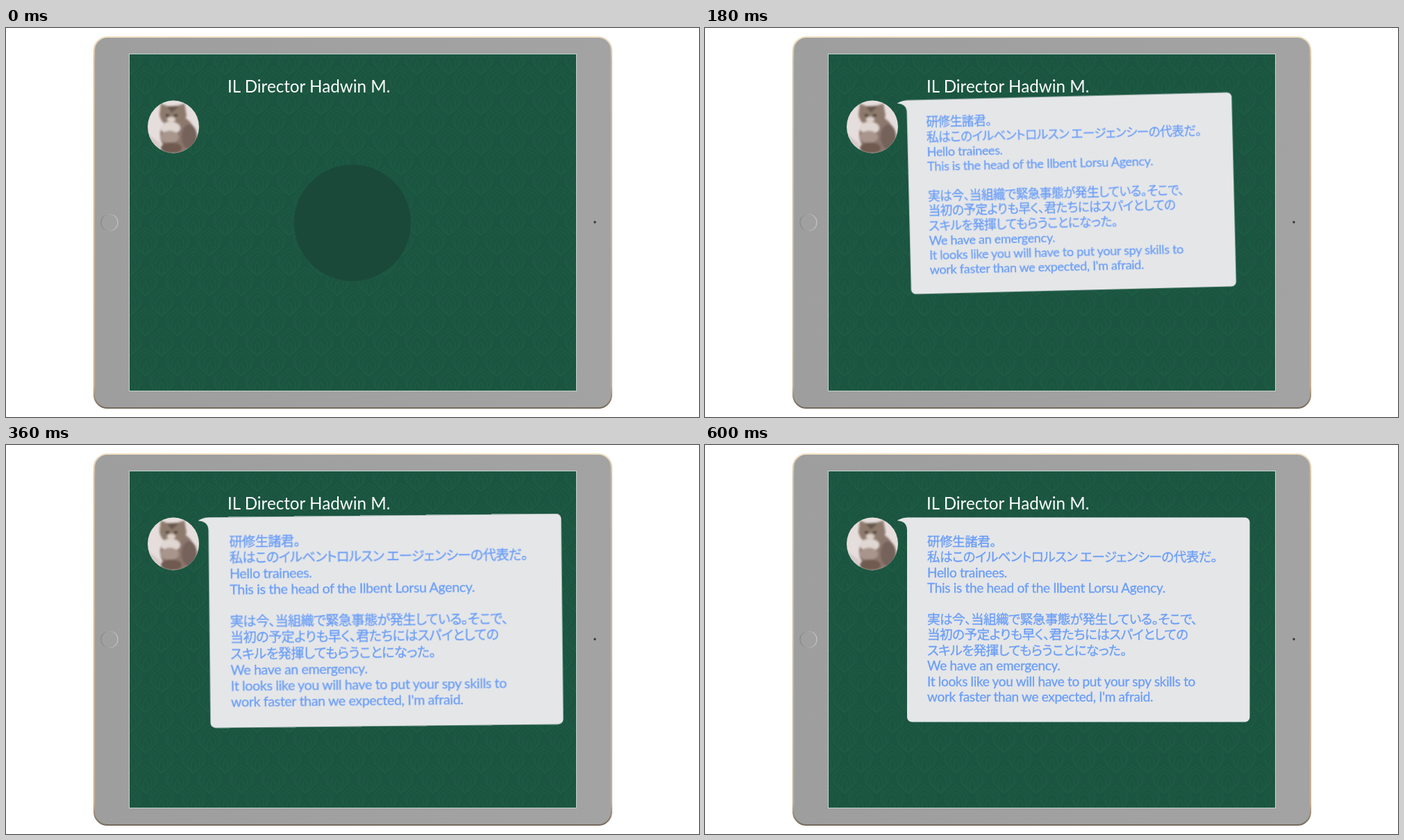
An HTML page that plays this animation: 998x561 px, repeating every 990 ms.

```html
<!DOCTYPE html>
<html lang="ja">
<head>
<meta charset="utf-8">
<title>Tablet message</title>
<style>
  html, body { margin: 0; width: 100%; height: 100%; overflow: hidden; background: #fff; }
  svg { display: block; width: 100%; height: 100%; }
  text { font-family: Lato, "Noto Sans CJK JP", "Noto Sans CJK", sans-serif; }
  .title { font-size: 24.2px; fill: #fff; }
  .line { fill: #6c9ff8; stroke: #6c9ff8; stroke-width: .35px; font-size: 19px; letter-spacing: -.32px; }
  .line.ja { font-family: "Noto Sans CJK JP", "Noto Sans CJK", sans-serif; font-size: 18.6px; letter-spacing: -.55px; font-feature-settings: "palt"; }
  #bubble { transform-origin: 277px 105px; opacity: 0; }
</style>
</head>
<body>
<svg viewBox="0 0 998 561">
  <defs>
    <linearGradient id="body" x2="1">
      <stop offset="0" stop-color="#9e9e9e"/>
      <stop offset="1" stop-color="#a3a3a3"/>
    </linearGradient>
    <linearGradient id="rim" x2="0" y2="1">
      <stop offset="0" stop-color="#f1e0c2"/>
      <stop offset=".06" stop-color="#cfbfa6"/>
      <stop offset=".94" stop-color="#c4b196"/>
      <stop offset="1" stop-color="#756a5c"/>
    </linearGradient>
    <linearGradient id="ring" x2="1">
      <stop offset="0" stop-color="#858585"/>
      <stop offset="1" stop-color="#c6c6c6"/>
    </linearGradient>
    <pattern id="deco" x="178" y="38" width="46" height="58" patternUnits="userSpaceOnUse">
      <g id="fans" fill="none" stroke="#1d5c43"></g>
    </pattern>
    <clipPath id="round"><ellipse cx="241" cy="142.5" rx="37" ry="38"/></clipPath>
    <filter id="soft"><feGaussianBlur stdDeviation="1.6"/></filter>
  </defs>

  <!-- tablet -->
  <rect x="127" y="13" width="745" height="535" rx="19" fill="url(#body)" stroke="url(#rim)" stroke-width="2.2"/>
  <circle cx="149" cy="280.5" r="12" fill="#a0a0a0" stroke="url(#ring)" stroke-width="1.2"/>
  <circle cx="848" cy="280" r="1.7" fill="#333"/>
  <rect x="177.5" y="37.5" width="644" height="486" fill="#1b5541"/>
  <rect x="177.5" y="37.5" width="644" height="486" fill="url(#deco)" stroke="#c3d3cb"/>
  <circle cx="499" cy="281" r="84" fill="#1a493a"/>

  <!-- kitten picture -->
  <g clip-path="url(#round)">
    <rect x="203" y="104" width="76" height="78" fill="#e6dedd"/>
    <g filter="url(#soft)">
      <path d="M203 152 L222 166 L222 182 L203 182Z" fill="#d6cac9"/>
      <ellipse cx="247" cy="154" rx="25" ry="27" fill="#8c776e"/>
      <ellipse cx="264" cy="157" rx="11" ry="18" fill="#75625a"/>
      <path d="M221 125 L223 109 L233 113 L247 112 L257 109 L260 126 Q257 142 240 142 Q224 141 221 125Z" fill="#8d7a6d"/>
      <path d="M231 113 L239 122 L249 113Z" fill="#66564c"/>
      <ellipse cx="237" cy="144" rx="14" ry="9" fill="#e0d7d2"/>
      <ellipse cx="238" cy="132" rx="6" ry="4" fill="#ddd0c8"/>
      <ellipse cx="236" cy="157" rx="13" ry="9" fill="#a8958c"/>
      <ellipse cx="238" cy="173" rx="15" ry="8" fill="#705a50"/>
      <path d="M230 126h5M242 126h5" stroke="#332b28" stroke-width="3"/>
    </g>
  </g>

  <text class="title" x="319" y="93">IL Director Hadwin M.</text>

  <g id="bubble">
    <path fill="#e5e6e8" d="M276.5 109 C282 105.8 287 104.5 295 104.5 H777.5 a7 7 0 0 1 7 7 V392.5 a7 7 0 0 1 -7 7 H298 a7 7 0 0 1 -7 -7 V123 C291 114 286 109.6 276.5 109Z"/>
  </g>
</svg>
<script>
const NS = 'http://www.w3.org/2000/svg';
const bubble = document.getElementById('bubble');

function add(parent, tag, attrs) {
  const el = document.createElementNS(NS, tag);
  for (const k in attrs) el.setAttribute(k, attrs[k]);
  return parent.appendChild(el);
}

// Staggered fans: a pointed arch around narrower leaves.
function fan(cx, base) {
  let d = '';
  for (const [w, h] of [[23, 40], [19, 35], [12, 30], [5, 20]]) {
    for (const s of [-1, 1]) {
      d += `M${cx} ${base} Q${cx + s * w * 1.5} ${base - h * .55} ${cx} ${base - h}`;
    }
  }
  add(document.getElementById('fans'), 'path', { d });
}
for (const y of [0, 58, 116]) {
  fan(23, y);
  fan(0, y - 29);
  fan(46, y - 29);
}

const lines = [
  '研修生諸君。',
  '私はこのイルベントロルスン エージェンシーの代表だ。',
  'Hello trainees.',
  'This is the head of the Ilbent Lorsu Agency.',
  '',
  '実は今、当組織で緊急事態が発生している。そこで、',
  '当初の予定よりも早く、君たちにはスパイとしての',
  'スキルを発揮してもらうことになった。',
  'We have an emergency.',
  'It looks like you will have to put your spy skills to',
  "work faster than we expected, I'm afraid."
];
lines.forEach((s, i) => {
  const cls = /^[\x20-\x7e]*$/.test(s) ? 'line' : 'line ja';
  add(bubble, 'text', { class: cls, x: 320, y: 145.6 + i * 22.45 }).textContent = s;
});

const LOOP = 990, STEP = 30, END = 600;
const sizes = [
  [30, .56], [60, .692], [120, .8595], [240, .992], [360, 1.0295],
  [420, 1.033], [480, 1.0264], [540, 1.0155], [600, 1]
];

const rate = i => (sizes[i + 1][1] - sizes[i][1]) / (sizes[i + 1][0] - sizes[i][0]);

function slope(i) {
  if (i === 0) return rate(0);
  if (i === sizes.length - 1) return rate(i - 1);
  const a = sizes[i][0] - sizes[i - 1][0], b = sizes[i + 1][0] - sizes[i][0];
  return (rate(i - 1) * b + rate(i) * a) / (a + b);
}

// Smooth curve through the size keys.
function scaleAt(t) {
  if (t >= END) return 1;
  let i = 0;
  while (t >= sizes[i + 1][0]) i++;
  const [t0, p] = sizes[i], [t1, q] = sizes[i + 1];
  const h = t1 - t0, u = (t - t0) / h, v = 1 - u;
  return p * v * v * (1 + 2 * u) + q * u * u * (3 - 2 * u)
    + h * u * v * (slope(i) * v - slope(i + 1) * u);
}

const angleAt = t => -.875 * (1 + Math.cos(Math.PI * Math.min(t / END, 1)));

const frames = [{ offset: 0, opacity: 0, transform: 'rotate(0deg) scale(1)', easing: 'step-end' }];
for (let t = STEP; t <= END; t += STEP) {
  frames.push({
    offset: t / LOOP, opacity: 1, easing: 'step-end',
    transform: `rotate(${angleAt(t).toFixed(3)}deg) scale(${scaleAt(t).toFixed(4)})`
  });
}
frames.push({ offset: 1, opacity: 1, transform: 'rotate(0deg) scale(1)' });
bubble.animate(frames, { duration: LOOP, iterations: Infinity });
</script>
</body>
</html>
```
